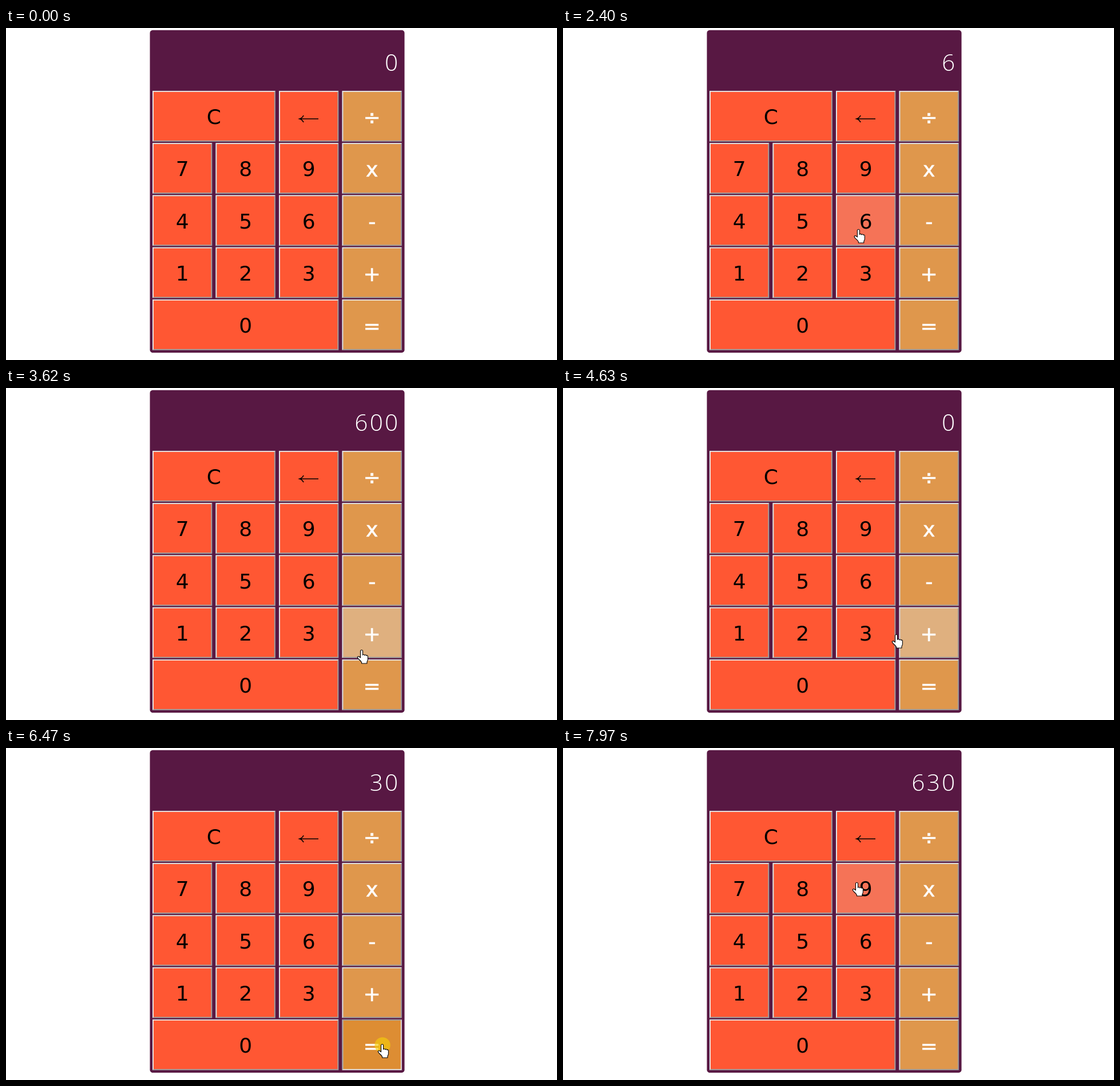
An HTML page that plays this animation: 963 px wide and 581 px high, repeating every 8000 ms.

```html
<!DOCTYPE html>
<html lang="en">
<head>
<meta charset="utf-8">
<title>Calculator</title>
<style>
  html, body { margin: 0; width: 100%; height: 100%; overflow: hidden; background: #fff; }
  svg { display: block; }
  text { text-anchor: middle; }
  .key text { font: 36px "DejaVu Sans", Verdana, sans-serif; fill: #000; }
  .key.op text { fill: #fff; stroke: #fff; stroke-width: .7; }
  .screen text { font: 300 40.5px "Open Sans", sans-serif; fill: #fff; }
  .face { fill: #ff5733; }
  .op .face { fill: #df974c; }
  .hover .face { fill: #f57357; }
  .op.hover .face { fill: #dfb07f; }
  .down .face { fill: #c55135; }
  .op.down .face { fill: #dd8d33; }
  .light, .down .dark { fill: #e3e3e3; }
  .dark, .down .light { fill: #a0a0a0; }
  .back { fill: none; stroke: #000; stroke-width: 1.7; }
  .pointer { fill: #fff; stroke: #000; stroke-width: 1.1; stroke-linejoin: round; }
</style>
</head>
<body>
<svg width="963" height="581" viewBox="0 0 963 581">
  <rect x="251.5" y="3.7" width="445" height="564.6" rx="5" fill="#581843"/>
  <g class="screen" id="screen">
    <text x="620.8" y="75"></text><text x="647.2" y="75"></text><text x="673.6" y="75"></text>
  </g>
  <g id="keys"></g>
  <g id="cursor">
    <circle id="click" r="13.7" fill="#f5cd0a" fill-opacity=".65"/>
    <path id="hand" class="pointer" transform="translate(-.5 -1)" d="M-2 1.5a2 2 0 0 1 4 0V8.5c.3-1.6 3.2-1.3 3.3.5.4-1.5 3-1.2 3.2.6.4-1.2 2.4-.8 2.4 1.2V16c0 2.5-1.5 3-1.5 5v2H0v-1.5C0 20-2.5 18-5 15.5c-1.5-1.7-3-3-2-4.2 1-1.1 3-.6 5 1.7Z"/>
    <path id="arrow" class="pointer" d="M0 0V16.5L3.8 13 6.4 19 9 17.9 6.5 12H11.7Z"/>
  </g>
</svg>
<script>
const $ = id => document.getElementById(id);
const LOOP = 8000, FRAME = 100, LAG = 100;

// A repeated label makes a wide key
const rows = ['CC←÷', '789x', '456-', '123+', '000='];
const keys = rows.flatMap((row, r) => [...new Set(row)].map(label => {
  const col = row.indexOf(label), span = row.lastIndexOf(label) - col + 1;
  const left = 256 + col * 110.5, top = 109.9 + r * 91.25;
  return { label, op: col === 3, left, top, right: left + span * 110.5 - 6.2, bottom: top + 88.9 };
}));

function markup({ label, op, left, top, right, bottom }) {
  const w = right - left, h = bottom - top;
  const glyph = label === '←'
    ? '<path class="back" d="M546 159H514M520 153Q518 157.500 513 159Q518 160.500 520 165"/>'
    : `<text x="${(left + right) / 2}" y="${top + (op ? 58.9 : 58.3)}">${label}</text>`;
  return `<g class="key${op ? ' op' : ''}">
    <rect class="dark" x="${left}" y="${top}" width="${w}" height="${h}"/>
    <path class="light" d="M${left} ${top}H${right}l-2 2H${left + 2}V${bottom - 2}l-2 2Z"/>
    <rect class="face" x="${left + 2}" y="${top + 2}" width="${w - 4}" height="${h - 4}"/>
    ${glyph}</g>`;
}
$('keys').innerHTML = keys.map(markup).join('');
keys.forEach((key, i) => { key.node = $('keys').children[i]; });
const digits = [...$('screen').children];

// Pointer moves: start, end, x, y
const moves = [
  [0, 0, 918, 565], [290, 990, 586, 259],
  [1400, 1600, 543, 291], [1600, 2000, 528, 335], [2300, 2800, 421, 517],
  [3320, 3550, 622, 460], [3600, 4000, 640, 432], [4300, 4900, 526, 434],
  [5300, 5500, 489, 484], [5540, 5800, 460, 520], [5950, 6250, 658, 520],
  [6700, 7500, 628, 330], [7570, 7900, 514, 237]
];
const clicks = [[2200, '6'], [3000, '0'], [3290, '0'], [4130, '+'], [5050, '3'], [5840, '0'], [6470, '=']];

const ease = k => k * k * (3 - 2 * k);

function pointAt(t) {
  let x = 0, y = 0;
  for (const [from, to, px, py] of moves) {
    if (t < from) break;
    const k = t < to ? ease((t - from) / (to - from)) : 1;
    x += (px - x) * k;
    y += (py - y) * k;
  }
  return [x, y];
}

function keyAt([x, y]) {
  return keys.find(k => x > k.left && x < k.right && y > k.top && y < k.bottom);
}

function displayAt(t) {
  let total = 0, shown = '0';
  for (const [at, label] of clicks) {
    if (t < at + FRAME) break;
    if (label === '+') { total += +shown; shown = '0'; }
    else if (label === '=') shown = String(total + +shown);
    else shown = shown === '0' ? label : shown + label;
  }
  return shown;
}

function draw(clock) {
  // The pointer is refreshed in steps, and the keys react a little late
  const t = Math.floor(clock / FRAME) * FRAME;
  const [x, y] = pointAt(t);
  const started = clock >= 290, outside = x > 697;
  const hover = started && keyAt(pointAt(t - LAG));
  const click = clicks.find(([at]) => clock >= at && clock < at + FRAME);

  for (const key of keys) {
    const down = !!click && key.label === click[1];
    key.node.classList.toggle('down', down);
    key.node.classList.toggle('hover', key === hover && !down);
  }
  const value = displayAt(clock).padStart(digits.length);
  digits.forEach((d, i) => { d.textContent = value[i].trim(); });

  const show = (id, on) => $(id).setAttribute('visibility', on ? 'visible' : 'hidden');
  $('cursor').setAttribute('transform', `translate(${x} ${y})`);
  show('click', !!click);
  show('hand', started && !outside);
  show('arrow', started && outside);
}

const start = performance.now();
function tick() {
  draw((performance.now() - start) % LOOP);
  requestAnimationFrame(tick);
}
tick();
</script>
</body>
</html>
```
